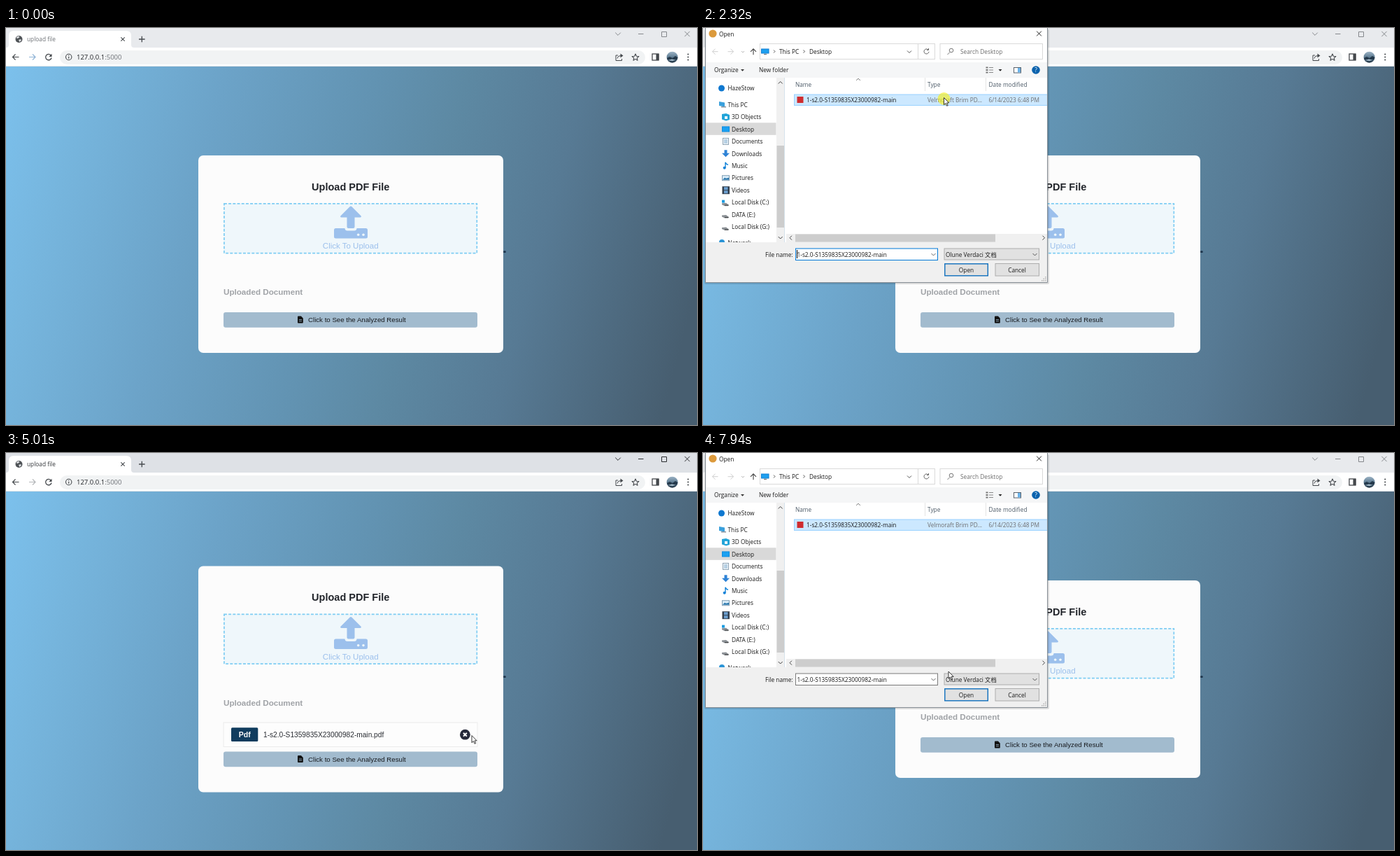
Animation of 988x567 px, one loop 8 s. Source, as an HTML page:

```html
<!DOCTYPE html>
<html lang="en">
<head>
<meta charset="utf-8">
<title>Upload file</title>
<style>
html, body { margin: 0; width: 100%; height: 100%; overflow: hidden; }
svg { display: block; width: 988px; height: 567px; }
text { white-space: pre; }
.ui { font: 8.3px "Open Sans", "Noto Sans", "Noto Sans CJK SC", sans-serif; }
.web { font-family: "Liberation Sans", Arial, sans-serif; }
</style>
</head>
<body>
<svg id="stage" viewBox="0 0 988 567" xmlns="http://www.w3.org/2000/svg"></svg>
<script>
const LOOP = 8000;
const stage = document.getElementById('stage');

// Markup helpers
const rect = (x, y, w, h, fill, more = '') =>
  `<rect x="${x}" y="${y}" width="${w}" height="${h}" fill="${fill}" ${more}/>`;
const box = (x, y, w, h, fill, stroke, more = '') =>
  rect(x + .5, y + .5, w - 1, h - 1, fill, `stroke="${stroke}" ${more}`);
const dot = (x, y, r, fill, more = '') => `<circle cx="${x}" cy="${y}" r="${r}" fill="${fill}" ${more}/>`;
const line = (d, stroke, w = 1, more = '') =>
  `<path d="${d}" fill="none" stroke="${stroke}" stroke-width="${w}" ${more}/>`;
const shape = (d, fill, more = '') => `<path d="${d}" fill="${fill}" ${more}/>`;
const ui = (x, y, s, fill = '#1a1a1a', more = '') =>
  `<text class="ui" x="${x}" y="${y + 3}" fill="${fill}" ${more}>${s}</text>`;
const web = (x, y, size, s, fill, more = '') =>
  `<text class="web" x="${x}" y="${y}" font-size="${size}" fill="${fill}" ${more}>${s}</text>`;
const group = (id, body, more = '') => `<g id="${id}" ${more}>${body}</g>`;
const cross = (x, y, r, stroke, w = 1) =>
  line(`M${x - r} ${y - r}l${2 * r} ${2 * r}m0 ${-2 * r}l${-2 * r} ${2 * r}`, stroke, w);
const chevron = (x, y, turn, stroke = '#444', r = 3, w = 1) =>
  line(`M${-r} ${-r / 2}L0 ${r / 2}L${r} ${-r / 2}`, stroke, w, `transform="translate(${x} ${y}) rotate(${turn})"`);
const arrow = (x, y, turn, stroke, r = 4.5, w = 1.2) =>
  line(`M${-r} 0H${r}M${r - 4} -4L${r} 0L${r - 4} 4`, stroke, w, `transform="translate(${x} ${y}) rotate(${turn})"`);

const MID = 'text-anchor="middle"';
const BOLD = 'font-weight="700"';
const INK = '#45494d';
const FILE = '1-s2.0-S1359835X23000982-main';

function defs() {
  const stops = [[0, '#7cc1ed'], [.12, '#76b5dd'], [.3, '#6ca3c8'], [.5, '#6293b2'],
    [.62, '#5d89a3'], [.78, '#577a94'], [1, '#475e70']];
  return `<defs><linearGradient id="sky" gradientUnits="userSpaceOnUse" x1="-4" y1="45" x2="1003" y2="315">
    ${stops.map(([o, c]) => `<stop offset="${o}" stop-color="${c}"/>`).join('')}</linearGradient>
    <linearGradient id="photo" x2="0" y2="1"><stop offset="0" stop-color="#9db4c6"/>
    <stop offset=".5" stop-color="#5f7d93"/><stop offset="1" stop-color="#1f3242"/></linearGradient></defs>`;
}

function browser() {
  const globe = dot(18.5, 16, 5, '#4f5357') +
    shape('M15 13l3 -1.5l1.5 1.5l-2 1.5l-2 .5zM18 17l3 -1l1 1.500l-2.500 2.500z', '#dfe1e4');
  const controls = chevron(875, 8.5, 0, 'currentColor', 3.8) + line('M904 8.5h7.500', 'currentColor') +
    line('M937.500 5.500h7v7h-7z', 'currentColor') + cross(974, 8.5, 3.6, 'currentColor');
  const star = 'M900 37l1.400 3.200l3.500 .3l-2.700 2.300l.8 3.400l-3 -1.800l-3 1.800l.8 -3.400l-2.700 -2.300l3.500 -.3z';
  return rect(0, 0, 988, 30, '#e8eaed', 'id="strip"') +
    shape('M0 28Q4 28 4 24V11Q4 4 11 4H172Q179 4 179 11V24Q179 28 183 28V30H0z', '#fff') +
    rect(0, 28, 988, 27, '#fff') + rect(0, 54, 988, 1, '#e3e6ea') + globe +
    group('tabText', ui(30, 16, 'upload file', 'currentColor')) +
    cross(167, 16, 2.7, INK, 1.1) + line('M190 16h8.600M194.300 11.700v8.600', INK, 1.3) +
    group('controls', controls) +
    arrow(14, 41.5, 180, INK) + group('forward', arrow(37.5, 41.5, 0, 'currentColor')) +
    line('M64 38.700A4.200 4.200 0 1 0 65 42.500', INK, 1.3) + shape('M65.500 36.800v4.200h-4.200z', INK) +
    rect(77, 32, 837, 20, '#f1f3f4', 'rx="10"') +
    dot(89.7, 41.5, 4.2, 'none', `stroke="${INK}" stroke-width="1.100"`) + line('M89.700 41v2.800M89.700 39v1.100', INK, 1.2) +
    ui(101, 41.8, '127.0.0.1<tspan fill="#6a6e73">:5000</tspan>', '#202327', 'style="font-size:9.5px"') +
    line('M875 39h-3v7.500h8.500v-2.500M874 43.500q.5 -4 5 -4', INK) + shape('M878.500 36.500l4 3l-4 3z', INK) +
    line(star, INK, 1.1, 'stroke-linejoin="round"') +
    box(923.5, 36.5, 10, 10, '#fff', INK, 'stroke-width="1.300"') + rect(929.5, 37, 4, 9, INK) +
    dot(952.6, 41.7, 8, 'url(#photo)') + shape('M945 43l4 -2l4 2l4 -3l3.500 2l-1 3h-13.500z', '#24394b') +
    shape('M947 46l5 -1.500l5 1l-4 1.500z', '#a9bfce') +
    [37.5, 41.5, 45.5].map(y => dot(975.3, y, 1.1, INK)).join('');
}

function card() {
  const blue = '#9cc0ec';
  const icon = shape('M493 254.500q.8 0 1.500 .7l13 13q1.200 1.800 -1 2.300h-8v13.500q0 2 -2 2h-7q-2 0 -2 -2V270.500h-8q-2.200 -.5 -1 -2.300l13 -13q.7 -.7 1.500 -.7z', blue) +
    shape('M471.500 286h13v.5q.5 3 3.500 3h10q3 0 3.500 -3v-.5h13q2.500 0 2.500 2.500v9.500q0 2.500 -2.500 2.500h-43q-2.500 0 -2.500 -2.500v-9.500q0 -2.500 2.500 -2.500z', blue) +
    dot(503.7, 295.2, 1.8, '#eff7fb') + dot(511, 295.2, 1.8, '#eff7fb');
  const top = web(492.7, 231.5, 14.5, 'Upload PDF File', '#22252b', `${MID} ${BOLD}`) +
    rect(311.9, 250.9, 361.4, 70.8, '#eff7fb', 'stroke="#7fcdf3" stroke-width="1.700" stroke-dasharray="4 2.200"') +
    icon + web(492.7, 315.3, 11.5, 'Click To Upload', blue, MID) +
    web(311, 381.2, 11.65, 'Uploaded Document', '#a0a3a7', BOLD);
  const item = box(310.5, 384.5, 364, 35.5, '#fdfdfd', '#ececec') +
    rect(322, 392.3, 38.3, 19.7, '#103c5e', 'rx="1.500"') +
    web(341.3, 405.6, 10.5, 'Pdf', '#fff', `${MID} ${BOLD}`) +
    web(368, 405.5, 10.17, FILE + '.pdf', '#2a2d33') +
    dot(656.4, 402.2, 7.4, '#25283a') + cross(656.4, 402.2, 2.4, '#fff', 2);
  const button = rect(311, 406, 363, 21.7, '#a2bbce', 'rx="3"') +
    shape('M417 412.500q0 -.9 .9 -.9h4l2.900 2.900v6q0 .9 -.9 .9h-6q-.9 0 -.9 -.9z', '#111') +
    line('M418.800 416.500h4.200M418.800 418.700h4.200', '#a2bbce', .8) +
    web(432, 420.1, 9.68, 'Click to See the Analyzed Result', '#191c20');
  return rect(711, 318.3, 3.8, 2.6, '#20384f', 'rx="1"') +
    rect(275, 182, 436, 282, '#fcfcfc', 'id="panel" rx="7"') +
    group('cardTop', top) + group('item', item) + group('cardButton', button);
}

function sidebar() {
  const names = ['3D Objects', 'Desktop', 'Documents', 'Downloads', 'Music', 'Pictures',
    'Videos', 'Local Disk (C:)', 'DATA (E:)', 'Local Disk (G:)'];
  const disk = y => shape(`M27 ${y + 1}l6 -.5l4 3l-1 1.500h-5l-4 -2z`, '#8d9297') + line(`M31 ${y + 4}h5.500`, '#333', .9);
  const icons = [
    y => shape(`M27 ${y - 4}l6 -1l5 2v7l-5 1.500l-6 -2z`, '#22a4d8') + rect(31, y - 1, 4, 4, '#e8f6fc'),
    y => rect(27, y - 4, 11, 8, '#0d8ce0') + rect(28, y - 3, 9, 6, '#1ba1f2'),
    y => box(28, y - 5, 9, 10, '#f4f8fb', '#8aa0b2') + line(`M30 ${y - 2}h5m-5 2h5m-5 2h5`, '#5b93c0', .8),
    y => shape(`M30.500 ${y - 5}h4v4.500h3.500l-5.500 5.500l-5.500 -5.500h3.500z`, '#2f83d6'),
    y => line(`M32 ${y + 3}v-8q1 3 4 3.500`, '#1483d8', 1.4) + dot(30.7, y + 3, 2, '#1483d8'),
    y => box(27, y - 4, 11, 8, '#dbeefa', '#7f9db2') + shape(`M28 ${y + 2.5}l3 -3l2 1l4 -1v3z`, '#2b78ad'),
    y => rect(27.5, y - 5.5, 10.5, 11, '#34404e') + rect(30, y - 4.5, 5.5, 4, '#6b9fd0') + rect(30, y + .5, 5.5, 4, '#6b9fd0'),
    y => disk(y) + rect(27, y - 3.5, 4, 4, '#1a9be0'), disk, disk];
  return rect(4, 71, 101, 235, '#fff') + rect(4, 135.3, 100.5, 17.5, '#d9d9d9') +
    dot(26.5, 86, 4.5, '#0f78d0') + ui(35.5, 86.3, 'HazeStow') +
    shape('M23 105l8 1.500v6l-8 -1.500z', '#3aa0dc') + rect(26, 112, 7, 1.5, '#8a959f') + ui(35.5, 109.5, 'This PC') +
    names.map((s, i) => icons[i](127 + i * 17.45) + ui(41, 127.2 + i * 17.45, s)).join('') +
    dot(27, 306, 4, '#2a94d6') + ui(35.5, 307, 'Network') +
    rect(105, 71, 11.5, 235, '#f0f0f0') + rect(105.5, 168, 10.5, 117, '#cdcdcd') +
    chevron(110.7, 78, 180) + chevron(110.7, 299.5, 0);
}

function dialog() {
  const head = rect(3.5, 0, 489.5, 49, '#fff') + rect(3.5, 49, 489.5, 22, '#f5f6f7') +
    dot(14, 8, 5.6, '#dc9a3c') + ui(23, 8.5, 'Open') + cross(480.5, 8, 3.4, '#222') +
    arrow(17.5, 33.7, 180, '#cfcfcf', 4, 1) + arrow(39.5, 33.7, 0, '#cfcfcf', 4, 1) +
    chevron(57, 34, 0, '#bbb', 2) + arrow(72, 34, -90, '#444', 4.2, 1.1) +
    box(81, 22, 251, 23, '#fff', '#dadada') + line('M307.500 22v23', '#dadada') +
    rect(83, 29.5, 11.5, 7, '#0f7fd4') + rect(84, 30.5, 9.5, 5, '#1ea0ef') + rect(87, 37, 4, 1, '#666') +
    chevron(102, 33.5, -90, '#555', 2) + ui(109, 33.6, 'This PC') +
    chevron(144.5, 33.5, -90, '#555', 2) + ui(152, 33.6, 'Desktop') + chevron(295, 34, 0, '#555') +
    line('M322 31A3.500 3.500 0 1 0 323 33.800M322.500 29v2.500h-2.500', '#666') +
    box(338.5, 22, 147.5, 23, '#fff', '#dadada') + dot(355, 32, 2.8, 'none', 'stroke="#777"') +
    line('M353 34.500l-3.500 3.500', '#777') + ui(368, 33.6, 'Search Desktop', '#6d6d6d') +
    ui(16, 60, 'Organize') + shape('M54 59h5l-2.500 2.800z', '#333') + ui(80, 60, 'New folder') +
    line('M404.500 56.500h3m-3 3.500h3m-3 3.500h3', '#777', 2) + line('M409 56.500h6m-6 3.500h6m-6 3.500h6', '#888') +
    shape('M422.500 59h5l-2.500 2.800z', '#222') +
    box(444, 56, 11, 8.5, '#fff', '#59636d') + rect(450, 57, 4, 6.5, '#6bb2e8') +
    dot(476, 60, 5.8, '#0a62ad') + ui(476, 60, '?', '#fff', `${MID} ${BOLD}`);
  const list = rect(116.5, 71, 376.5, 235, '#fff') + chevron(222, 73.5, 180, '#777', 2.8) +
    line('M317.500 71v19M404.500 71v19', '#e3e3e3') +
    ui(132, 81.3, 'Name', '#4c5a67') + ui(321, 81.3, 'Type', '#4c5a67') + ui(408.5, 81.3, 'Date modified', '#4c5a67') +
    box(130, 94.5, 363, 16.5, '#fff', '#fff', 'id="row"') + rect(134.5, 98, 9, 9, '#cf2c2f') +
    ui(148, 103.2, FILE) + ui(321, 103.2, 'Velmoraft Brim PD...', '#6d6d6d') + ui(408.5, 103.2, '6/14/2023 6:48 PM', '#6d6d6d') +
    rect(119, 294, 374, 12, '#f0f0f0') + rect(132, 294.5, 286, 11, '#cdcdcd') +
    chevron(125.5, 299.7, 90) + chevron(487, 299.7, -90);
  let grip = '';
  for (let i = 0; i < 6; i++) grip += rect(489 - 2.5 * [0, 1, 2, 0, 1, 0][i], 360 - 2.5 * [0, 0, 0, 1, 1, 2][i], 1.5, 1.5, '#b5b5b5');
  const foot = rect(3.5, 306, 489.5, 57.5, '#f0f0f0') + ui(89, 323.5, 'File name:') +
    box(132, 314.5, 204, 17.5, '#fff', '#7a7a7a', 'id="field"') +
    group('fieldText', ui(134.5, 323.5, FILE)) + rect(134, 317, 1, 12, '#000', 'id="caret"') +
    chevron(329.5, 323.5, 0, '#666') +
    box(344.5, 314.5, 136.5, 17, '#e1e1e1', '#adadad') + ui(347, 323.5, 'Olune Verdaci 文档') + chevron(474.5, 323.5, 0, '#555') +
    rect(345.8, 336.8, 61.5, 17, '#e1e1e1', 'id="open" stroke="#0f6fbd" stroke-width="1.400"') + ui(376.5, 345.5, 'Open', '#1a1a1a', MID) +
    box(417.5, 336, 63.5, 18.5, '#e1e1e1', '#adadad') + ui(449, 345.5, 'Cancel', '#1a1a1a', MID) + grip;
  return rect(2, 2, 493, 364, '#000', 'opacity=".12" rx="2"') + head + sidebar() + list + foot +
    line('M3.500 0V363.500H492.500V0', '#858d94');
}

const pointer = dot(0, 1.5, 9, '#f5ee1e', 'id="press" opacity=".65"') +
  shape('M0 0V10.200L2.400 8L4.100 11.800L5.700 11.100L4.100 7.400H7.200Z', '#fff', 'stroke="#222" stroke-width=".9"') +
  dot(8.3, 0, 3.6, '#d9effb', 'id="busy" stroke="#2a94dc" stroke-width="2.200"');

stage.innerHTML = defs() + rect(0, 0, 988, 567, 'url(#sky)') + browser() + card() +
  group('dialog', dialog()) + group('cursor', pointer);

const el = {};
stage.querySelectorAll('[id]').forEach(n => el[n.id] = n);

// Pointer path: time, x, y
const PATH = [
  [340, 767, 543], [520, 563, 302], [580, 566.5, 299], [1510, 566.5, 299], [1850, 395, 34], [2130, 344.5, 99.5],
  [2380, 344.5, 99.5], [2910, 364, 349], [3910, 364, 349], [4600, 666, 405], [5000, 666, 403.5],
  [5130, 665, 403], [5250, 656.5, 401], [6050, 656.5, 401], [6250, 538.5, 271], [6800, 538.5, 271],
  [7200, 350, 115], [7300, 350, 115], [7410, 345, 104], [7640, 345, 104], [7940, 351, 312]];

const within = (t, ...spans) => spans.some(([a, b]) => t >= a && t < b);
const ramp = (t, a, b) => Math.min(1, Math.max(0, (t - a) / (b - a)));
const show = (node, on) => node.setAttribute('visibility', on ? 'inherit' : 'hidden');

function pointerAt(t) {
  const i = PATH.findIndex(p => p[0] > t);
  if (i < 0) return PATH[PATH.length - 1].slice(1);
  if (i === 0) return PATH[0].slice(1);
  const [a, ax, ay] = PATH[i - 1], [b, bx, by] = PATH[i];
  const k = ramp(t, a, b), e = k * k * (3 - 2 * k);
  return [ax + (bx - ax) * e, ay + (by - ay) * e];
}

function draw(t) {
  const active = within(t, [860, 1050], [3380, 6590]);
  el.strip.setAttribute('fill', active ? '#dee1e6' : '#e8eaed');
  el.controls.setAttribute('color', active ? '#2b2d30' : '#85888c');
  el.tabText.setAttribute('color', active ? '#34373b' : '#6d7176');
  el.forward.setAttribute('color', t < 3380 ? '#8fb3d6' : '#b3b6b9');

  const uploaded = within(t, [3380, 5560]);
  const shift = uploaded ? 20.5 : 0;
  el.panel.setAttribute('y', 182 - shift);
  el.panel.setAttribute('height', 282 + 2 * shift);
  el.cardTop.setAttribute('transform', `translate(0 ${-shift})`);
  el.cardButton.setAttribute('transform', `translate(0 ${shift})`);
  show(el.item, uploaded);

  const opened = within(t, [1140, 3380], [6710, LOOP]);
  show(el.dialog, opened);
  el.dialog.setAttribute('opacity', t < 3380 ? ramp(t, 1100, 1240) : ramp(t, 6670, 6810));

  const chosen = within(t, [2320, 3380], [7600, LOOP]);
  const hover = within(t, [2060, 2320], [7300, 7600]);
  const [fill, edge] = within(t, [3070, 3380]) ? ['#d9d9d9', '#d9d9d9']
    : chosen ? ['#cce8ff', '#99d1ff'] : hover ? ['#e5f3ff', '#e5f3ff'] : ['#fff', '#fff'];
  el.row.setAttribute('fill', fill);
  el.row.setAttribute('stroke', edge);
  show(el.fieldText, chosen);
  show(el.caret, within(t, [2320, 2850]));
  el.field.setAttribute('stroke', within(t, [2320, 2850]) ? '#0078d7' : '#7a7a7a');
  el.open.setAttribute('fill', within(t, [3070, 3380]) ? '#cce4f7' : within(t, [2850, 3070]) ? '#e5f1fb' : '#e1e1e1');

  const [x, y] = pointerAt(t);
  el.cursor.setAttribute('transform', `translate(${x.toFixed(2)} ${y.toFixed(2)})`);
  show(el.cursor, t >= 340);
  show(el.press, within(t, [860, 980], [2320, 2380], [3070, 3380], [5530, 5590], [6470, 6590], [7600, 7660]));
  show(el.busy, within(t, [6590, 6800]));
}

const start = performance.now();
function tick() {
  draw((performance.now() - start) % LOOP);
  requestAnimationFrame(tick);
}
tick();
</script>
</body>
</html>
```
